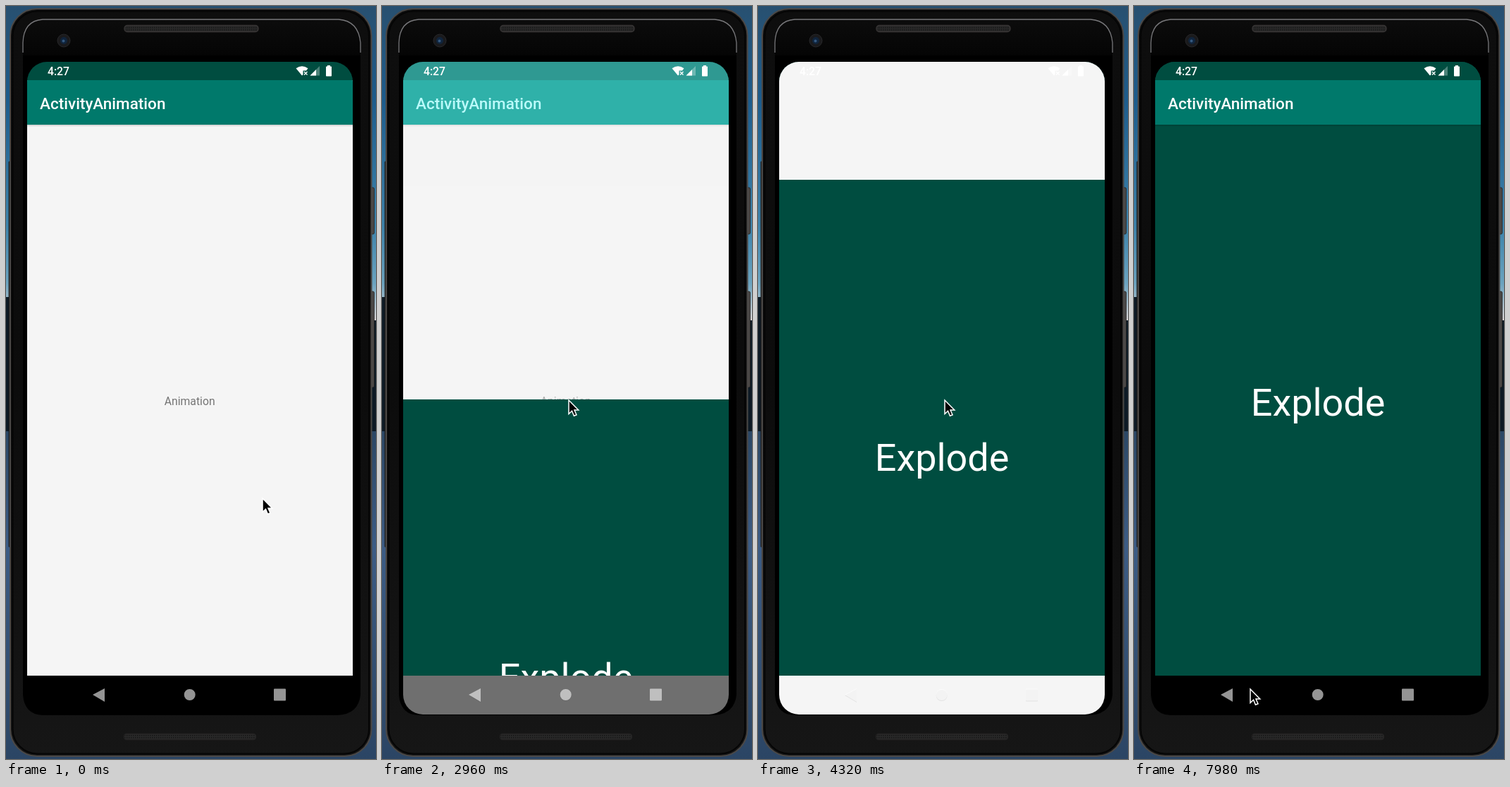
Recreate the animation shown at these times as an HTML page. Size 525x1066 px, loop 8000 ms.

```html
<!DOCTYPE html>
<html lang="en">
<head>
<meta charset="utf-8">
<title>Explode transition</title>
<style>
  html, body { margin: 0; width: 100%; height: 100%; overflow: hidden; background: #000; }
  svg { display: block; width: 100vw; height: 100vh; }
  text { font-family: Roboto, sans-serif; }
  .title { font-size: 22.5px; font-weight: 500; fill: #fff; }
</style>
</head>
<body>
<svg viewBox="0 0 525 1066">
  <defs>
    <linearGradient id="sky" x2="0" y2="1">
      <stop offset="0" stop-color="#285070"/>
      <stop offset=".3" stop-color="#1d5c8c"/>
      <stop offset=".7" stop-color="#3d83ab"/>
      <stop offset=".88" stop-color="#6ba3bf"/>
      <stop offset="1" stop-color="#d9d3d3"/>
    </linearGradient>
    <linearGradient id="water" x2="0" y2="1">
      <stop offset="0" stop-color="#2b4765"/>
      <stop offset=".35" stop-color="#3c5c85"/>
      <stop offset="1" stop-color="#2b4564"/>
    </linearGradient>
    <linearGradient id="body" x2="0" y2="1">
      <stop offset="0" stop-color="#0e0e0e"/>
      <stop offset=".5" stop-color="#0c0c0c"/>
      <stop offset="1" stop-color="#161616"/>
    </linearGradient>
    <linearGradient id="glass" x2="0" y2="1">
      <stop offset="0" stop-color="#0c0c0c"/>
      <stop offset=".8" stop-color="#050505"/>
      <stop offset="1" stop-color="#000"/>
    </linearGradient>
    <linearGradient id="shade" x2="0" y2="1">
      <stop offset="0" stop-opacity=".18"/>
      <stop offset="1" stop-opacity="0"/>
    </linearGradient>
    <pattern id="mesh" width="3" height="3" patternUnits="userSpaceOnUse">
      <rect width="3" height="3" fill="#292929"/>
      <rect width="1.5" height="1.5" fill="#151515"/>
    </pattern>
    <clipPath id="screen"><rect x="30" y="79" width="462" height="924" rx="28"/></clipPath>
    <clipPath id="page"><rect x="30" y="105" width="462" height="843"/></clipPath>
    <g id="appBar">
      <rect x="30" y="168" width="462" height="3" fill="url(#shade)"/>
      <rect x="30" y="105" width="462" height="63" fill="#00796b"/>
      <text class="title" x="48" y="145.5">ActivityAnimation</text>
    </g>
    <rect id="statusBar" x="30" y="79" width="462" height="26" fill="#004d40"/>
    <rect id="navBar" x="30" y="948" width="462" height="55"/>
    <g id="navIcons">
      <path d="M123 975L140 966V985Z"/>
      <circle cx="260.700" cy="975" r="8"/>
      <rect x="380" y="966.500" width="17" height="17" rx="1"/>
    </g>
  </defs>

  <!-- desktop behind the phone -->
  <rect width="525" height="446" fill="url(#sky)"/>
  <rect y="412" width="200" height="190" fill="#0d1a25"/>
  <rect x="200" y="445" width="325" height="157" fill="#0d1a25"/>
  <rect y="602" width="525" height="464" fill="url(#water)"/>

  <!-- phone -->
  <g fill="#4b4847" stroke="#1b1b1b" stroke-width=".7">
    <rect x="516" y="257" width="6.500" height="66" rx="2"/>
    <rect x="516" y="404" width="6.500" height="136" rx="2"/>
    <rect x="4" y="220" width="4" height="546" rx="1" fill="#232323"/>
  </g>
  <rect x="6" y="4" width="512.500" height="1058" rx="38" fill="url(#body)" stroke="#4b4846" stroke-width="2"/>
  <rect x="9.500" y="7.500" width="505.500" height="1051" rx="35" fill="none" stroke="#050505" stroke-width="2"/>
  <path d="M24 79V52Q25 21 52 19H472Q500 21 503 52V79Z" fill="url(#glass)"/>
  <path d="M24 66V52Q25 21 52 19H472Q500 21 503 52V66" fill="none" stroke="#77777a" stroke-width="1.300"/>
  <path d="M24 70H503V975Q500 1003 470 1004H52Q26 1003 24 975Z"/>
  <g stroke="#393636" stroke-width="1.300" fill="url(#mesh)">
    <rect x="168" y="27.500" width="190" height="9" rx="4"/>
    <rect x="167.500" y="1030.500" width="187" height="8" rx="3.500" stroke="#242323"/>
  </g>
  <circle cx="82" cy="49" r="9" fill="#1a1a1c" stroke="#29292b"/>
  <circle cx="82" cy="49" r="5" fill="#10243c"/>
  <circle cx="81.500" cy="49.500" r="2" fill="#34587f"/>

  <g clip-path="url(#screen)">
    <!-- first activity -->
    <rect x="30" y="105" width="462" height="843" fill="#f5f5f5"/>
    <use href="#statusBar"/>
    <use href="#appBar"/>
    <text x="260.700" y="564.500" font-size="15.740" text-anchor="middle" fill="#757575">Animation</text>
    <use href="#navBar"/>
    <g id="fade">
      <rect id="fadeTop" x="30" y="79" width="462" height="89"/>
      <rect x="30" y="168" width="462" height="835" fill="#f5f5f5"/>
    </g>

    <!-- second activity -->
    <g clip-path="url(#page)">
      <g id="content">
        <rect x="30" y="168" width="462" height="780" fill="#004d40"/>
        <text x="261" y="580" font-size="53.900" text-anchor="middle" fill="#fff">Explode</text>
      </g>
      <use id="bar" href="#appBar"/>
    </g>
    <use id="status" href="#statusBar"/>
    <use id="nav" href="#navBar"/>

    <!-- system icons -->
    <g fill="#fff">
      <text x="59" y="98" font-size="15.740" font-weight="500">4:27</text>
      <path d="M411.500 88.300Q420 82 428.500 88.300L426 91.500H421.500V97L420 98.500Z"/>
      <path d="M423 93L427.500 97.500M427.500 93L423 97.500" stroke="#fff" stroke-width="1.400"/>
      <path d="M431.500 98.500L445 85V98.500Z" opacity=".3"/>
      <path d="M431.500 98.500L440 90V98.500Z"/>
      <path d="M456 85.500V84H460V85.500H461.200Q462 85.500 462 86.300V98.700Q462 99.500 461.200 99.500H454.800Q454 99.500 454 98.700V86.300Q454 85.500 454.800 85.500Z"/>
    </g>
    <use href="#navIcons" y="1" opacity=".07"/>
    <use href="#navIcons" fill="#fff" opacity=".58"/>
  </g>

  <path id="cursor" d="M0 0V19.500L4.500 15.300L7.400 22.300L11 20.800L8 14H13.800Z" stroke="#fff" stroke-width="1.500"/>
</svg>
<script>
const LOOP = 8000, LANDED = 5808;
const $ = id => document.getElementById(id);
const clamp = u => Math.min(1, Math.max(0, u));
const ease = u => (1 - Math.cos(Math.PI * clamp(u))) / 2;

// Every part decelerates over 3 s from the same distance and lands at its own time.
const offset = (t, end) => 577 * clamp((end - t) / 3000) ** 2;

// Parts: element, landing time, direction, time at which it first exists
const parts = [
  ['content', 5424, 1, 2424],
  ['bar', 5784, -1, 4700],
  ['status', 5798, -1, 5000],
  ['nav', LANDED, 1, 4800]
];

// Pointer stops: time, x, y
const stops = [
  [40, 364, 697], [800, 277, 575], [1660, 276, 566], [2350, 265, 558],
  [5800, 265, 558], [6350, 259, 570], [6650, 259, 570], [7800, 165, 967], [LOOP, 165, 967]
];

function pointer(t) {
  const i = stops.findIndex(s => s[0] > t);
  if (i < 1) return stops[0].slice(1);
  const [a, b] = [stops[i - 1], stops[i]];
  const u = ease((t - a[0]) / (b[0] - a[0]));
  return [1, 2].map(k => a[k] + (b[k] - a[k]) * u);
}

function draw(t) {
  for (const [id, end, dir, from] of parts) {
    $(id).setAttribute('visibility', t < from ? 'hidden' : 'visible');
    $(id).setAttribute('transform', `translate(0 ${dir * offset(t, end)})`);
  }
  // The top bars turn a brighter teal before they pale.
  const fade = ease((t - 2562) / 848);
  $('fade').setAttribute('opacity', t < LANDED ? fade : 0);
  $('fadeTop').setAttribute('fill', `rgb(${245 * ease(fade)}, 245, 245)`);
  $('cursor').setAttribute('transform', `translate(${pointer(t)})`);
}

const start = performance.now();
function tick() {
  draw((performance.now() - start) % LOOP);
  requestAnimationFrame(tick);
}
tick();
</script>
</body>
</html>
```
